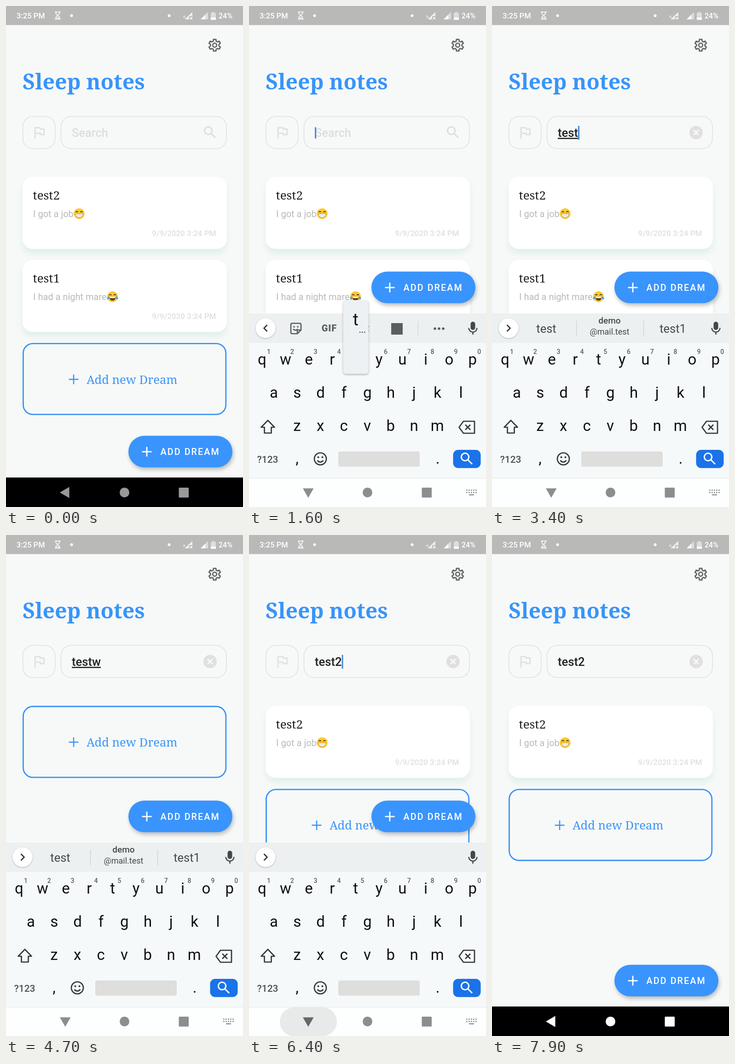
Recreate the animation shown at these times as an HTML page. Size 515x1087 px, loop 8000 ms.

```html
<!DOCTYPE html>
<html lang="en">
<head>
<meta charset="utf-8">
<title>Dream journal search</title>
<style>
html, body { margin: 0; width: 100%; height: 100%; overflow: hidden; background: #f7f9f8; }
svg { display: block; }
text { font-family: Roboto, sans-serif; }
.slab { font-family: "Noto Serif", serif; }
.mid { text-anchor: middle; }
.medium { font-weight: 500; }
.line { fill: none; stroke-linejoin: round; }
.field { fill: none; stroke: #dedfde; stroke-width: 1.5; }
.card { fill: #fefffe; filter: drop-shadow(0 10px 7px rgba(165, 215, 208, .27)); }
.blue { stroke: #3994f8; fill: none; stroke-width: 2.8; }
.fab { filter: drop-shadow(2px 5px 4px rgba(0, 0, 0, .25)); }
.key { font-size: 33px; fill: #0e1011; text-anchor: middle; }
.dark { stroke: #36393c; stroke-width: 2.7; }
.popup { filter: drop-shadow(0 2px 2px rgba(0, 0, 0, .28)); }
</style>
</head>
<body>
<svg width="515" height="1087" viewBox="0 0 515 1087">
  <defs>
    <g id="lens" class="line" stroke="currentColor" stroke-width="3">
      <circle cx="-4" cy="-4" r="8.2"/><path d="M2 2L11.5 11.5"/>
    </g>
    <polygon id="gear"/>
    <g id="grin">
      <circle r="11.7" fill="#fdca2f"/>
      <path class="line" stroke="#5b3a1c" stroke-width="1.8" d="M-7.5 -3q2.5-4 5 0M2.5 -3q2.5-4 5 0"/>
      <path d="M-8 .5H8Q7.500 8.500 0 8.500T-8 .5Z" fill="#fff" stroke="#a87c3a" stroke-width=".8"/>
      <path d="M-7 4.500H7M-3.500 1V8M0 1V8M3.500 1V8" stroke="#c9c4ba" stroke-width=".7"/>
    </g>
    <g id="joy">
      <circle r="11.7" fill="#fdca2f"/>
      <path class="line" stroke="#5b3a1c" stroke-width="1.8" d="M-7.5 -3q2.5-4 5 0M2.5 -3q2.5-4 5 0"/>
      <path d="M-7 0H7Q6.500 8.500 0 8.500T-7 0Z" fill="#6b3a1c"/>
      <path d="M-6.500 0H6.500L5.500 3H-5.500Z" fill="#fff"/>
      <path d="M-8 -1q-5 2-4 6q4 2 5-2ZM8 -1q5 2 4 6q-4 2-5-2Z" fill="#42a8e8"/>
    </g>
  </defs>

  <rect width="515" height="1087" fill="#f7f9f8"/>
  <rect width="515" height="41.400" fill="#b9bab8"/>
  <g fill="#fff">
    <text class="medium" x="23" y="27" font-size="16.500">3:25 PM</text>
    <path class="line" stroke="#fff" stroke-width="1.7" d="M106 13h13M106 28.500h13M108.500 13v4l7.500 7v4M116 13v4l-7.500 7v4M110 26h5"/>
    <circle cx="142.500" cy="21" r="3"/><circle cx="354.500" cy="21" r="3"/>
    <text x="385" y="26" font-size="8">R</text>
    <path d="M388 29L405 13V22H398V29Z" opacity=".75"/>
    <path class="line" stroke="#fff" stroke-width="1.5" d="M400 24l5 5m0-5l-5 5"/>
    <path d="M423 29L439 13V29Z" opacity=".5"/><path d="M423 29L433 19V29Z"/>
    <path d="M445 15h3v-2h5v2h3v15h-11Z" opacity=".5"/><path d="M445 25h11v5h-11Z"/>
    <text class="medium" x="462" y="27" font-size="16">24%</text>
  </g>
  <g transform="translate(453.500 85)" class="line" stroke="#666867" stroke-width="2.800">
    <use href="#gear"/><circle r="4.300"/>
  </g>
  <text class="slab" x="36" y="181" font-size="46.400" font-weight="700" fill="#3994fa">Sleep notes</text>

  <rect class="field" x="36.700" y="239.500" width="70" height="70" rx="22"/>
  <path transform="translate(54 256.500) scale(1.500)" fill="#e0e2e1" d="M12.360 6l.4 2H18v6h-3.360l-.4-2H7V6h5.360M14 4H5v17h2v-7h5.600l.4 2h7V6h-5.600L14 4z"/>
  <rect class="field" x="119.500" y="239.500" width="359.500" height="70" rx="22"/>
  <text id="hint" class="medium" x="143" y="284" font-size="25.400" fill="#dcdedd">Search</text>
  <text id="query" class="medium" x="143" y="284" font-size="25.600" fill="#1f2122"></text>
  <rect id="caret" width="3" fill="#4489e4"/>
  <use id="find" href="#lens" x="443.500" y="274.500" color="#dcdedd"/>
  <g id="clear">
    <circle cx="443.500" cy="274.500" r="14.500" fill="#dfe0df"/>
    <path d="M438 269l11 11m0-11l-11 11" stroke="#fafbfa" stroke-width="2.800"/>
  </g>

  <g id="list"></g>

  <g id="fab">
    <rect class="fab" x="266" width="226" height="68.500" rx="34.200" fill="#3994fd"/>
    <path d="M295.500 34.500h21m-10.500-10.500v21" stroke="#fff" stroke-width="2.800"/>
    <text class="medium" x="335.500" y="41.500" font-size="19.700" letter-spacing="2.100" fill="#fff">ADD DREAM</text>
  </g>

  <g id="keyboard">
    <rect y="667" width="515" height="65" fill="#edf0f1"/>
    <rect y="731" width="515" height="293" fill="#f6f9fa"/>
    <circle cx="36" cy="699" r="21.500" fill="#fff" style="filter:drop-shadow(0 1px 1.500px #0004)"/>
    <path id="chevron" class="line dark" d="M3.500-7l-7 7 7 7"/>
    <g id="tools" fill="#5a5e61">
      <g class="line" stroke="#5a5e61" stroke-width="2.600">
        <path d="M93.500 688.500h17a2.500 2.500 0 0 1 2.500 2.500v12l-8 8H93.500a2.500 2.500 0 0 1-2.500-2.500V691a2.500 2.500 0 0 1 2.500-2.500ZM113 703h-8v8M96 701q5 5 10 0"/>
      </g>
      <circle cx="98" cy="696" r="1.800"/><circle cx="106" cy="696" r="1.800"/>
      <text class="mid" x="174.500" y="706" font-size="20" font-weight="900" letter-spacing="1">GIF</text>
      <use href="#gear" x="248.500" y="700"/><circle cx="248.500" cy="700" r="4.300" fill="#edf0f1"/>
      <rect x="309" y="688" width="25" height="25"/>
      <path d="M367.500 684v31" stroke="#d3d7d9" stroke-width="1.500"/>
      <circle cx="404" cy="700" r="2.800"/><circle cx="413" cy="700" r="2.800"/><circle cx="422" cy="700" r="2.800"/>
    </g>
    <g id="words" fill="#44484b"></g>
    <rect x="481.500" y="685" width="10" height="18" rx="5" fill="#44484b"/>
    <path class="line" stroke="#44484b" stroke-width="2.600" d="M477.500 698.500a9 9 0 0 0 18 0M486.500 707.500v5.500"/>

    <g id="keys"></g>
    <g class="line dark">
      <path d="M41 899L55.500 914H48.500V926.500H33.500V914H26.500Z"/>
      <path d="M466 901H490V927H466L456.500 914ZM470 908.500l11 11m0-11l-11 11"/>
      <circle cx="155" cy="982.500" r="13"/><path d="M148.500 986q6.500 7 13 0"/>
    </g>
    <circle cx="150.500" cy="979" r="2.100" fill="#36393c"/><circle cx="159.500" cy="979" r="2.100" fill="#36393c"/>
    <text class="mid medium" x="40.500" y="991" font-size="21" fill="#4b4f52">?123</text>
    <rect x="194" y="966.500" width="177" height="33" rx="4" fill="#dededd"/>
    <rect x="443.500" y="963" width="60" height="39.500" rx="11" fill="#1a73e8"/>
    <use href="#lens" x="473.500" y="982.500" color="#fff"/>

    <g id="popup">
      <rect class="popup" x="-27" y="-140" width="55" height="160" rx="6" fill="#eef1f3"/>
      <text id="popupKey" class="key" y="-85" style="font-size:37px"></text>
      <text x="7" y="-69" font-size="18" font-weight="500" fill="#333">...</text>
    </g>
  </g>

  <g id="darkNav">
    <rect y="1023" width="515" height="64"/>
    <g id="darkIcons">
      <path d="M117 1055.500L137.500 1043.500V1067.500Z"/><circle cx="257.500" cy="1055.500" r="10.500"/>
      <rect x="375.500" y="1045" width="21.500" height="21.500" rx="1.500"/>
    </g>
  </g>
  <g id="lightNav">
    <rect y="1024" width="515" height="63" fill="#fdfefe"/>
    <path d="M0 1024.500H515" stroke="#e4e7e8"/>
    <rect id="press" x="67" y="1025" width="124" height="62" rx="31" fill="#e8eaea"/>
    <g fill="#8c8e8e">
      <path id="back" d="M117 1046.500H140.500L128.700 1067Z"/><circle cx="257.500" cy="1055.500" r="10.500"/>
      <rect x="375.500" y="1045" width="21.500" height="21.500" rx="1.500"/>
    </g>
    <path d="M472 1050.500h23M472 1055.500h23" stroke="#8c8e8e" stroke-width="2.600" stroke-dasharray="2.800 2.200"/>
    <path d="M478 1060.500h11" stroke="#8c8e8e" stroke-width="2.400"/>
  </g>
</svg>
<script>
const LOOP = 8000;
const $ = id => document.getElementById(id);
const show = (id, on) => { $(id).style.display = on ? '' : 'none'; };
const move = (id, x, y) => $(id).setAttribute('transform', `translate(${x} ${y})`);

// Six trapezoid teeth around a ring.
$('gear').setAttribute('points', Array.from({ length: 24 }, (_, i) => {
  const [offset, r] = [[-20, 9.3], [-12, 13], [12, 13], [20, 9.3]][i % 4];
  const a = (Math.floor(i / 4) * 60 + offset) * Math.PI / 180;
  return [r * Math.sin(a), -r * Math.cos(a)].map(v => v.toFixed(2));
}).join(' '));

// Key rows: letters, first centre, baseline.
const keyAt = {};
let keyMarkup = '';
for (const [letters, x0, y] of [['qwertyuiop', 28.5, 778], ['asdfghjkl', 54, 850], ['zxcvbnm', 104.5, 922]]) {
  [...letters].forEach((letter, i) => {
    const x = x0 + i * 50.8;
    keyAt[letter] = [x, y];
    keyMarkup += `<text class="key" x="${x}" y="${y}">${letter}</text>`;
    if (y === 778) {
      keyMarkup += `<text class="mid medium" x="${x + 14.5}" y="755" font-size="14" fill="#5a5e61">${(i + 1) % 10}</text>`;
    }
  });
}
$('keys').innerHTML = keyMarkup +
  '<text class="key" x="104.500" y="993">,</text><text class="key" x="410" y="993">.</text>';

const dream = (title, body, emoji, emojiX) => `
  <rect class="card" x="36" width="444" height="156.500" rx="22"/>
  <text class="slab" x="58.500" y="49.500" font-size="26" fill="#1d1f1f">${title}</text>
  <text x="59" y="87" font-size="20" fill="#b8bab9">${body}</text>
  <use href="#${emoji}" x="${emojiX}" y="80"/>
  <text class="medium" x="456.500" y="128" font-size="17" text-anchor="end" fill="#dee1e0">9/9/2020 3:24 PM</text>`;
const items = {
  test2: dream('test2', 'I got a job', 'grin', 159),
  test1: dream('test1', 'I had a night mare', 'joy', 231.5),
  add: `<rect class="blue" x="37.400" y="1.400" width="440.400" height="153.800" rx="21"/>
    <path class="blue" d="M136.500 79h21m-10.500-10.500v21" style="stroke-width:2.500"/>
    <text class="slab" x="175" y="88.500" font-size="25.600" fill="#3994f8">Add new Dream</text>`
};
const BOTH = ['test2', 'test1', 'add'];
const TEST_WORDS = ['test', 'demo@mail.test', 'test1'];

const wordMarkup = words => words.map((word, i) => {
  const x = [118, 255.5, 393][i];
  const [name, host] = word.split('@');
  return host
    ? `<text class="mid medium" x="${x}" y="689" font-size="19">${name}</text>
       <text class="mid" x="${x}" y="713" font-size="18">@${host}</text>`
    : `<text class="mid" x="${x}" y="709" font-size="25.500">${word}</text>`;
}).join('') + (words.length ? '<path d="M183.500 683v34M329.500 683v34" stroke="#cfd3d5" stroke-width="1.500"/>' : '');

// Each step changes only what it names.
const steps = [
  [0, { query: '', caret: false, items: BOTH, words: [], popup: '', open: false, drop: 0, press: false, nav: '#999' }],
  [100, { open: true, drop: 70, caret: true }],
  [200, { drop: 0 }],
  [700, { caret: false }],
  [1200, { caret: true }],
  [1600, { popup: 't' }],
  [1700, { query: 't', words: ['t', 'the', 'to'] }],
  [1800, { popup: 'e' }],
  [1900, { query: 'te', words: ['te', 'test', 'the'] }],
  [2000, { popup: 's' }],
  [2100, { query: 'tes', words: ['tes', 'test', 'yes'] }],
  [2200, { popup: 't' }],
  [2300, { query: 'test', words: TEST_WORDS }],
  [2400, { popup: '' }],
  [2800, { caret: false }],
  [3300, { caret: true }],
  [3900, { popup: 'w' }],
  [4000, { query: 'testw', items: ['add'] }],
  [4100, { popup: '' }],
  [4500, { caret: false }],
  [4900, { query: 'test', items: BOTH, caret: true }],
  [5200, { popup: 'w' }],
  [5500, { popup: '2' }],
  [5600, { popup: '', query: 'test2', items: ['test2', 'add'], words: [] }],
  [6000, { caret: false }],
  [6400, { caret: true, press: true }],
  [6500, { drop: 150 }],
  [6600, { open: false, drop: 0, press: false, nav: '#fff' }],
  [6900, { caret: false }],
  [7400, { caret: true }],
  [7900, { caret: false }]
];
let last = {};
const states = steps.map(([, change]) => (last = { ...last, ...change }));

function render(s) {
  const typed = s.query !== '';
  show('hint', !typed);
  show('find', !typed);
  show('clear', typed);
  const query = $('query');
  query.textContent = s.query;
  query.setAttribute('text-decoration', typed && s.query !== 'test2' ? 'underline' : 'none');

  const caret = $('caret');
  show('caret', s.caret);
  caret.setAttribute('x', 143 + (typed ? query.getComputedTextLength() : 0));
  caret.setAttribute('y', typed ? 260 : 263);
  caret.setAttribute('height', typed ? 30 : 24.5);

  $('list').innerHTML = s.items.map((name, i) =>
    `<g transform="translate(0 ${370.6 + i * 180.2})">${items[name]}</g>`).join('');
  move('fab', 0, s.open ? 576.3 : 932.6);

  show('keyboard', s.open);
  move('keyboard', 0, s.drop);
  show('tools', !typed);
  $('chevron').setAttribute('transform', `translate(36 699) scale(${typed ? -1 : 1} 1)`);
  $('words').innerHTML = wordMarkup(s.words);
  show('popup', s.popup);
  if (s.popup) {
    move('popup', ...keyAt[s.popup === '2' ? 'w' : s.popup]);
    $('popupKey').textContent = s.popup;
  }

  show('lightNav', s.open);
  show('darkNav', !s.open);
  show('press', s.press);
  $('back').setAttribute('fill', s.press ? '#666868' : '#8c8e8e');
  $('darkIcons').setAttribute('fill', s.nav);
}

let shown = -1;
const start = performance.now();
function tick() {
  const t = (performance.now() - start) % LOOP;
  const index = steps.findLastIndex(([at]) => at <= t);
  if (index !== shown) render(states[shown = index]);
  requestAnimationFrame(tick);
}
tick();
</script>
</body>
</html>
```
